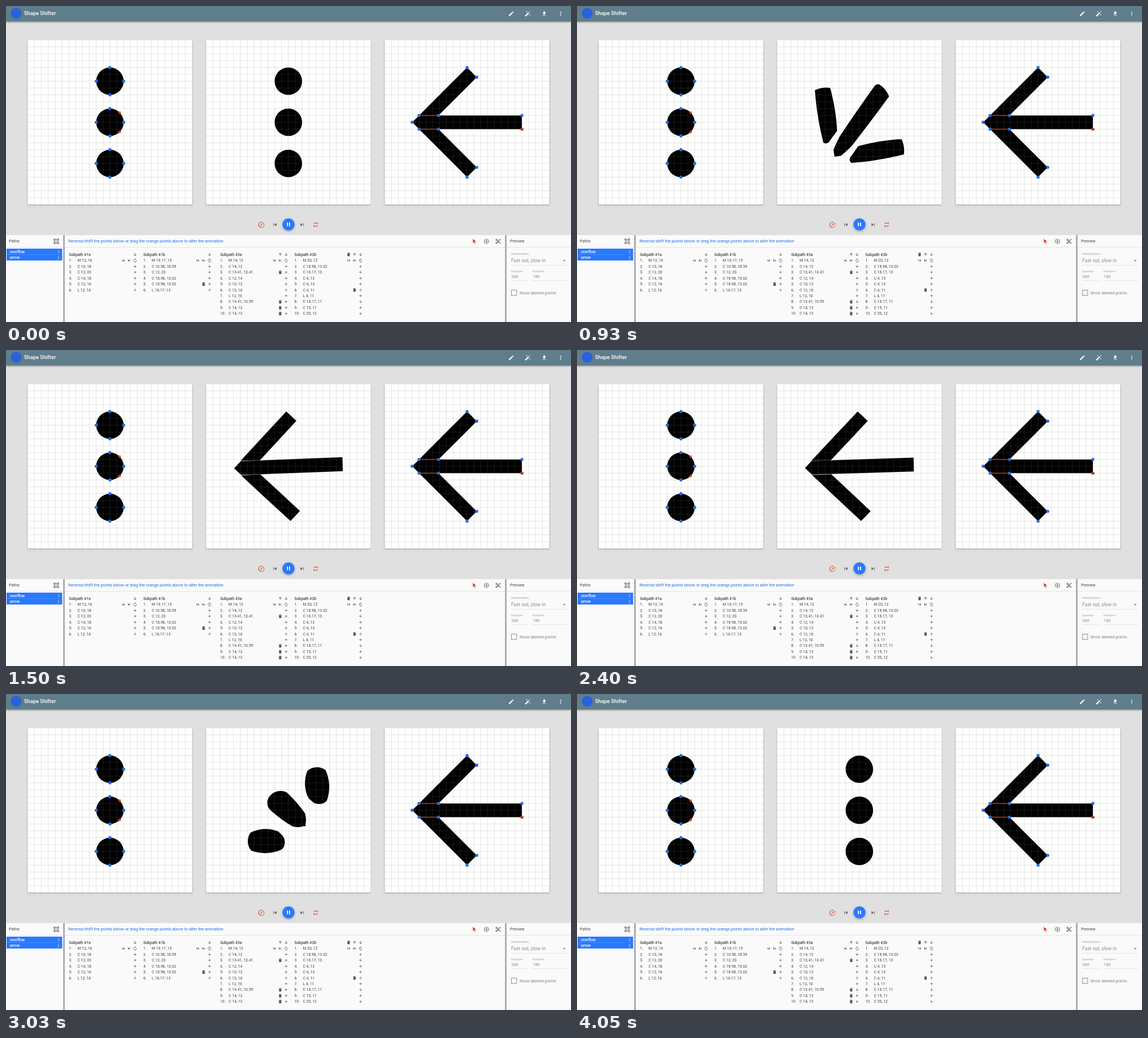
An HTML page with a canvas that plays this animation: 1000x560 px, repeating every 4080 ms.

```html
<!DOCTYPE html>
<html lang="en">
<head>
<meta charset="utf-8">
<title>Path morphing</title>
<style>
html, body { margin: 0; width: 100%; height: 100%; overflow: hidden; background: #e0e0e0; }
canvas, svg { position: absolute; left: 0; top: 0; width: 1000px; height: 560px; }
text { font-family: Roboto, Arial, sans-serif; white-space: pre; }
</style>
</head>
<body>
<canvas id="stage"></canvas>
<svg id="labels" viewBox="0 0 1000 560"></svg>
<script>
const canvas = document.getElementById('stage');
const labels = document.getElementById('labels');
const ctx = canvas.getContext('2d');
const dpr = window.devicePixelRatio || 1;
canvas.width = 1000 * dpr;
canvas.height = 560 * dpr;

const LOOP = 4080, STEP = 30;
const TOP = 60.5, SIZE = 291.2, UNIT = SIZE / 24;
const CARDS = [38.4, 354.2, 670.4];
const BLUE = '#2979ff', DOT = '#2b68e8', ORANGE = '#d84315', INK = '#424242', GREY = '#616161';

const glyphs = {
  edit: 'M3 17.25V21h3.75L17.81 9.94l-3.75-3.75zM20.71 7.04c.39-.39.39-1.02 0-1.41l-2.34-2.34c-.39-.39-1.02-.39-1.41 0l-1.83 1.83 3.75 3.75z',
  wand: 'M7.5 5.6L10 7 8.6 4.5 10 2 7.5 3.4 5 2l1.4 2.5L5 7zM19.5 15.4L17 14l1.4 2.5L17 19l2.5-1.4L22 19l-1.4-2.5L22 14zM22 2l-2.5 1.4L17 2l1.4 2.5L17 7l2.5-1.4L22 7l-1.4-2.5zM14.4 7.3c-.4-.4-1-.4-1.4 0L1.3 19c-.4.4-.4 1 0 1.4l2.3 2.3c.4.4 1 .4 1.4 0L16.7 11c.4-.4.4-1 0-1.4z',
  download: 'M19 9h-4V3H9v6H5l7 7zM5 18v2h14v-2z',
  more: 'M10 6a2 2 0 1 0 4 0a2 2 0 1 0-4 0M10 12a2 2 0 1 0 4 0a2 2 0 1 0-4 0M10 18a2 2 0 1 0 4 0a2 2 0 1 0-4 0',
  prev: 'M6 6h2v12H6zm3.5 6l8.5 6V6z',
  next: 'M6 18l8.5-6L6 6zM16 6v12h2V6z',
  pause: 'M6 19h4V5H6zm8-14v14h4V5z',
  repeat: 'M7 7h10v3l4-4-4-4v3H5v6h2zm10 10H7v-3l-4 4 4 4v-3h12v-6h-2z',
  trash: 'M6 19c0 1.1.9 2 2 2h8c1.1 0 2-.9 2-2V7H6zM19 4h-3.5l-1-1h-5l-1 1H5v2h14z',
  add: 'M19 13h-6v6h-2v-6H5v-2h6V5h2v6h6z',
  addRing: 'M13 7h-2v4H7v2h4v4h2v-4h4v-2h-4zm-1-5C6.48 2 2 6.48 2 12s4.48 10 10 10 10-4.48 10-10S17.52 2 12 2zm0 18c-4.41 0-8-3.59-8-8s3.59-8 8-8 8 3.59 8 8-3.59 8-8 8z',
  down: 'M20 12l-1.41-1.41L13 16.17V4h-2v12.17l-5.58-5.59L4 12l8 8z',
  up: 'M4 12l1.41 1.41L11 7.83V20h2V7.83l5.58 5.59L20 12l-8-8z',
  turn: 'M12 6v3l4-4-4-4v3c-4.42 0-8 3.58-8 8 0 1.57.46 3.03 1.24 4.26L6.7 14.8c-.45-.83-.7-1.79-.7-2.8 0-3.31 2.69-6 6-6zm6.76 1.74L17.3 9.2c.44.84.7 1.79.7 2.8 0 3.31-2.69 6-6 6v-3l-4 4 4 4v-3c4.42 0 8-3.58 8-8 0-1.57-.46-3.03-1.24-4.26z',
  cut: 'M9.64 7.64c.23-.5.36-1.05.36-1.64 0-2.21-1.79-4-4-4S2 3.79 2 6s1.79 4 4 4c.59 0 1.14-.13 1.64-.36L10 12l-2.36 2.36C7.14 14.13 6.59 14 6 14c-2.21 0-4 1.79-4 4s1.79 4 4 4 4-1.79 4-4c0-.59-.13-1.14-.36-1.64L12 14l7 7h3v-1zM6 8a2 2 0 1 1 0-4a2 2 0 1 1 0 4zm0 12a2 2 0 1 1 0-4a2 2 0 1 1 0 4zM19 3l-6 6 2 2 7-7V3z',
  cursor: 'M6 2l13 11.3-5.8.5 3.4 7.2-2.4 1.1-3.2-7.4L6 18.6z',
  drop: 'M5 9.5l7 7 7-7z'
};
const icons = {};
for (const name in glyphs) icons[name] = new Path2D(glyphs[name]);

// Subpaths: a start point followed by cubic curves, as flat numbers.
function arcs(cx, cy, angles) {
  const rad = angles.map(a => a * Math.PI / 180);
  const out = [cx + 2 * Math.cos(rad[0]), cy + 2 * Math.sin(rad[0])];
  for (let i = 1; i < rad.length; i++) {
    const a = rad[i - 1], b = rad[i], h = 8 / 3 * Math.tan((b - a) / 4);
    const ax = cx + 2 * Math.cos(a), ay = cy + 2 * Math.sin(a);
    const bx = cx + 2 * Math.cos(b), by = cy + 2 * Math.sin(b);
    out.push(ax - h * Math.sin(a), ay + h * Math.cos(a),
             bx + h * Math.sin(b), by - h * Math.cos(b), bx, by);
  }
  return out;
}

function lines(points) {
  const out = [...points[0]];
  for (let i = 1; i < points.length; i++) {
    const [ax, ay] = points[i - 1], [bx, by] = points[i];
    for (const k of [1 / 3, 2 / 3, 1]) out.push(ax + (bx - ax) * k, ay + (by - ay) * k);
  }
  return out;
}

const arm = [[16.17, 13], [10.58, 18.59], [12, 20], [18.98, 13.02], [18.98, 13.02], [16.17, 13]];
const bar = [[20, 12], [18.98, 13.02], [16.17, 13], [4, 13], [4, 13], [4, 11], [4, 11], [16.17, 11], [19, 11], [20, 12]];
const dots = [
  arcs(12, 18, [-90, -180, -270, -360, -450, -450]),
  arcs(12, 12, [0, 0, 45, 90, 180, 270, 270, 315, 360, 360]),
  arcs(12, 6, [90, 180, 270, 360, 450, 450])
];
const arrow = [lines(arm), lines(bar), lines(arm.map(([x, y]) => [x, 24 - y]))];

function ease(x) {
  let lo = 0, hi = 1;
  for (let i = 0; i < 30; i++) {
    const s = (lo + hi) / 2, r = 1 - s;
    if (1.2 * r * r * s + 0.6 * r * s * s + s * s * s < x) lo = s; else hi = s;
  }
  return lo * lo * (3 - 2 * lo);
}

function along(keys, t) {
  if (t <= keys[0][0]) return keys[0][1];
  for (let i = 1; i < keys.length; i++) {
    const [t0, v0] = keys[i - 1], [t1, v1] = keys[i];
    if (t <= t1) return v0 + (v1 - v0) * (t - t0) / (t1 - t0);
  }
  return keys[keys.length - 1][1];
}

const FORTH = [[317, 0], [690, 0.266], [1200, 0.65], [1500, 0.855], [1712, 1]];
const BACK = [[2304, 0], [3784, 1]];
const morphAt = t => t < 2000 ? ease(along(FORTH, t)) : 1 - ease(along(BACK, t));

function rect(x, y, w, h, color) {
  ctx.fillStyle = color;
  ctx.fillRect(x, y, w, h);
}

function disc(x, y, r, color) {
  ctx.fillStyle = color;
  ctx.beginPath();
  ctx.arc(x, y, r, 0, 7);
  ctx.fill();
}

function icon(name, x, y, size, color = GREY) {
  ctx.save();
  ctx.translate(x - size / 2, y - size / 2);
  ctx.scale(size / 24, size / 24);
  ctx.fillStyle = color;
  ctx.fill(icons[name], 'evenodd');
  ctx.restore();
}

function shadow(blur, dy, alpha, draw) {
  ctx.save();
  ctx.shadowColor = `rgba(0,0,0,${alpha})`;
  ctx.shadowBlur = blur * dpr;
  ctx.shadowOffsetY = dy * dpr;
  draw();
  ctx.restore();
}

function card(x, f, turn, marks) {
  shadow(2.5, 1, 0.28, () => rect(x, TOP, SIZE, SIZE, '#fff'));
  ctx.save();
  ctx.translate(x, TOP);
  ctx.scale(UNIT, UNIT);
  ctx.save();
  ctx.translate(12, 12);
  ctx.rotate(turn * Math.PI);
  ctx.translate(-12, -12);
  ctx.beginPath();
  dots.forEach((from, n) => {
    const p = from.map((v, i) => v + (arrow[n][i] - v) * f);
    ctx.moveTo(p[0], p[1]);
    for (let i = 2; i < p.length; i += 6) ctx.bezierCurveTo(...p.slice(i, i + 6));
    ctx.closePath();
  });
  ctx.fillStyle = '#000';
  ctx.fill();
  ctx.restore();
  ctx.beginPath();
  for (let i = 1; i < 24; i++) {
    ctx.moveTo(i, 0); ctx.lineTo(i, 24);
    ctx.moveTo(0, i); ctx.lineTo(24, i);
  }
  ctx.lineWidth = 0.08;
  ctx.strokeStyle = 'rgba(128,128,128,.21)';
  ctx.stroke();
  if (marks) marks();
  ctx.restore();
}

function dotMarks() {
  for (const y of [6, 12, 18])
    for (const [dx, dy] of [[0, -2], [2, 0], [0, 2], [-2, 0]]) disc(12 + dx, y + dy, 0.23, DOT);
  disc(13.41, 10.59, 0.19, ORANGE);
  disc(13.41, 13.41, 0.19, ORANGE);
}

function arrowMarks() {
  for (const y of [11, 13]) rect(5, y - 0.05, 2.83, 0.1, ORANGE);
  for (const [x, y] of [[12, 4], [13.41, 5.41], [5, 11], [7.83, 11]]) {
    disc(x, y, 0.23, DOT);
    disc(x, 24 - y, 0.23, DOT);
  }
  disc(4, 12, 0.23, DOT);
  disc(20, 11, 0.23, DOT);
  disc(20, 13, 0.23, '#8f3a1c');
  disc(20, 13, 0.16, ORANGE);
}

function controls() {
  ctx.strokeStyle = ORANGE;
  ctx.lineWidth = 1.1;
  ctx.beginPath();
  ctx.arc(452, 387.7, 4.7, Math.PI / 2, Math.PI * 1.5);
  ctx.stroke();
  ctx.setLineDash([2.3, 1.2]);
  ctx.beginPath();
  ctx.arc(452, 387.7, 4.7, -Math.PI / 2, Math.PI / 2);
  ctx.stroke();
  ctx.setLineDash([]);
  ctx.beginPath();
  ctx.moveTo(450.6, 389.2);
  ctx.lineTo(454, 385.7);
  ctx.stroke();
  icon('prev', 476, 387.5, 11);
  shadow(4, 1.5, 0.35, () => disc(500, 387, 10.6, BLUE));
  icon('pause', 500, 387, 11, '#fff');
  icon('next', 524, 387.5, 11);
  icon('repeat', 548, 387.5, 11, ORANGE);
}

// Right edge of each list, head icons from the right, rows with a trash icon.
const lists = [
  { x: 111.5, edge: 228.5, name: 'Subpath #1a', head: ['down'], cut: [],
    rows: ['M 12, 16', 'C 10, 18', 'C 12, 20', 'C 14, 18', 'C 12, 16', 'L 12, 16'] },
  { x: 243, edge: 360.2, name: 'Subpath #1b', head: ['down'], cut: [5],
    rows: ['M 16.17, 13', 'C 10.58, 18.59', 'C 12, 20', 'C 18.98, 13.02', 'C 18.98, 13.02', 'L 16.17, 13'] },
  { x: 379, edge: 495.8, name: 'Subpath #2a', head: ['down', 'up'], cut: [3, 8, 9, 10],
    rows: ['M 14, 12', 'C 14, 12', 'C 13.41, 13.41', 'C 12, 14', 'C 10, 12', 'C 12, 10', 'L 12, 10', 'C 13.41, 10.59', 'C 14, 12', 'C 14, 12'] },
  { x: 510.5, edge: 627.4, name: 'Subpath #2b', head: ['down', 'up', 'trash'], cut: [6],
    rows: ['M 20, 12', 'C 18.98, 13.02', 'C 16.17, 13', 'C 4, 13', 'C 4, 13', 'C 4, 11', 'L 4, 11', 'C 16.17, 11', 'C 19, 11', 'C 20, 12'] }
];
const rowY = i => 451 + i * 10.45;

function listIcons({ edge, head, cut, rows }) {
  const at = (name, i, y) => icon(name, edge - i * 10.5, y, 8.2, '#555');
  head.forEach((name, i) => at(name, i, 440.3));
  ['turn', 'next', 'prev'].forEach((name, i) => at(name, i, rowY(0)));
  for (let i = 1; i < rows.length; i++) at('add', 0, rowY(i));
  cut.forEach(n => at('trash', 1, rowY(n - 1)));
}

function panels() {
  rect(0, 406, 1000, 154, '#fafafa');
  rect(0, 427, 1000, 0.8, '#e0e0e0');
  rect(101.3, 406, 2.6, 154, '#a2a2a2');
  rect(883.3, 406, 2.6, 154, '#a2a2a2');

  ctx.strokeStyle = GREY;
  ctx.lineWidth = 0.8;
  ctx.strokeRect(85.5, 413.5, 7, 7);
  ctx.beginPath();
  ctx.arc(89, 417, 2.1, 0, 7);
  ctx.stroke();
  for (const x of [85.5, 92.5])
    for (const y of [413.5, 420.5]) {
      rect(x - 1.3, y - 1.3, 2.6, 2.6, GREY);
      rect(x - 0.5, y - 0.5, 1, 1, '#fafafa');
    }

  rect(1, 430, 98.4, 21, BLUE);
  rect(1, 440.3, 98.4, 0.5, '#5a98ff');
  icon('more', 93, 435.4, 8, '#fff');
  icon('more', 93, 445.9, 8, '#fff');

  icon('cursor', 829, 417, 10.5, ORANGE);
  icon('addRing', 850.3, 417, 10.5);
  icon('cut', 871, 417, 10.8);
  lists.forEach(listIcons);

  icon('drop', 988, 451, 9, '#8a8a8a');
  for (const [x, y, w] of [[894, 459, 99], [894, 486, 30], [932, 486, 61]]) rect(x, y, w, 0.6, '#d6d6d6');
  ctx.strokeStyle = '#808080';
  ctx.lineWidth = 0.9;
  ctx.strokeRect(894.5, 503.5, 9.4, 9.4);
}

function header() {
  shadow(3, 1, 0.3, () => rect(0, 0, 1000, 27.6, '#607d8b'));
  disc(18, 13, 9.6, '#2962dc');
  ['edit', 'wand', 'download', 'more'].forEach((name, i) => icon(name, 894.3 + i * 29.2, 13.7, 11, '#fff'));
}

function label(str, x, y, size, color = INK, weight = 400) {
  const el = document.createElementNS(labels.namespaceURI, 'text');
  el.setAttribute('x', x);
  el.setAttribute('y', y);
  el.setAttribute('font-size', size);
  el.setAttribute('font-weight', weight);
  el.setAttribute('fill', color);
  el.textContent = str;
  labels.append(el);
}

function writeLabels() {
  label('Shape Shifter', 32, 16.2, 9.3, '#fff', 500);
  label('Paths', 5, 419.2, 7.3);
  label('overflow', 7, 437.8, 6.8, '#fff', 500);
  label('arrow', 7, 448.2, 6.8, '#fff', 500);
  label('Reverse/shift the points below or drag the orange points above to alter the animation', 110.5, 419.2, 7.3, '#1f6fe5');
  for (const { x, name, rows } of lists) {
    label(name, x, 442.8, 6.75, INK, 500);
    rows.forEach((row, i) => {
      label(`${i + 1}.`, x, rowY(i) + 2.3, 6.8);
      label(row, x + 15, rowY(i) + 2.3, 6.8);
    });
  }
  label('Preview', 892, 419.2, 7.3);
  label('Interpolator', 894, 441.2, 6.1, '#a5a5a5');
  label('Fast out, slow in', 894, 453.8, 8.5, '#8a8a8a');
  label('Duration', 894, 472.2, 5.6, '#a5a5a5');
  label('Rotation', 932, 472.2, 5.6, '#a5a5a5');
  label('300', 894, 481.8, 7.5, '#8a8a8a');
  label('180', 932, 481.8, 7.5, '#8a8a8a');
  label('Show labeled points', 908.5, 511, 7.3, '#808080');
}

function draw(now) {
  const t = Math.floor(now % LOOP / STEP) * STEP;
  const f = morphAt(t);
  ctx.setTransform(dpr, 0, 0, dpr, 0, 0);
  rect(0, 0, 1000, 560, '#e0e0e0');
  header();
  card(CARDS[0], 0, 0, dotMarks);
  card(CARDS[1], f, f);
  card(CARDS[2], 1, 1, arrowMarks);
  controls();
  panels();
}

const start = performance.now();
function tick() {
  draw(performance.now() - start);
  requestAnimationFrame(tick);
}
writeLabels();
tick();
</script>
</body>
</html>
```
